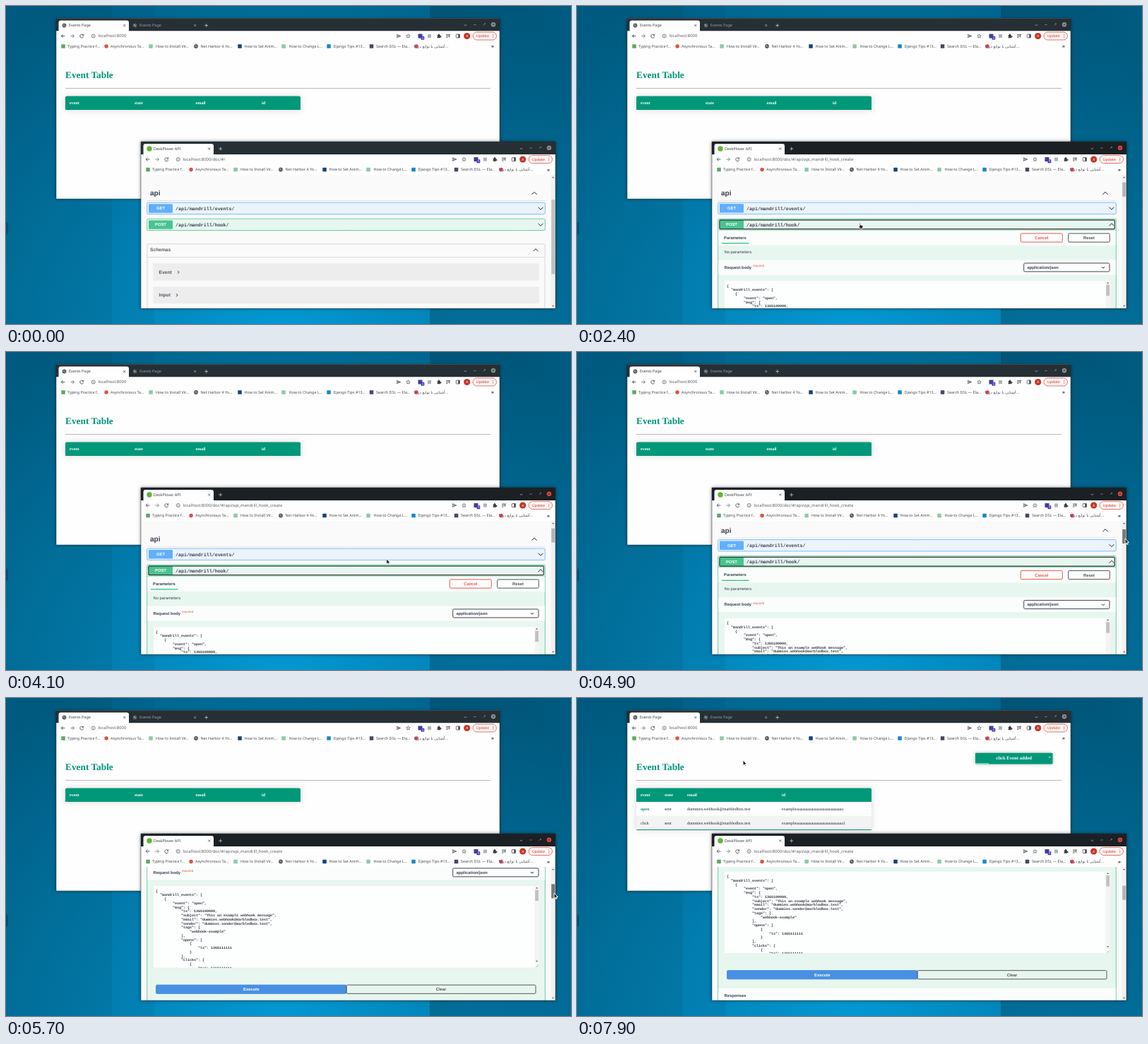
These frames come from a looping animation (800 px wide and 450 px high, 8 s). An HTML page with a canvas:

```html
<!DOCTYPE html>
<html lang="en">
<head>
<meta charset="utf-8">
<title>Event table demo</title>
<style>
html, body { margin: 0; width: 100%; height: 100%; overflow: hidden; background: #006a94; }
canvas { display: block; width: 800px; height: 450px; }
</style>
</head>
<body>
<canvas id="stage" width="800" height="450"></canvas>
<script>
const c = document.getElementById('stage').getContext('2d');
c.textRendering = 'geometricPrecision';

const UI = '"Noto Sans", sans-serif';
const SERIF = '"Liberation Serif", serif';
const SANS = '"Liberation Sans", sans-serif';
const MONO = '"Liberation Mono", monospace';
const GREEN = '#009879', INK = '#3b4151', ICON = '#4a4e52';
const EMAIL = 'dummies.webhook@marbledbox.test';
const EVENT_ID = 'example' + 'a'.repeat(25);

// y is the middle of the line
function text(s, x, y, size, color, font = UI, bold = false, align = 'left') {
  c.font = `${bold ? 'bold ' : ''}${size}px ${font}`;
  c.fillStyle = color;
  c.textAlign = align;
  c.fillText(s, x, y + size * 0.34);
}
function box(x, y, w, h, fill, stroke, r = 0, lw = 0.8) {
  c.beginPath();
  c.roundRect(x, y, w, h, r);
  if (fill) { c.fillStyle = fill; c.fill(); }
  if (stroke) { c.strokeStyle = stroke; c.lineWidth = lw; c.stroke(); }
}
function disc(x, y, r, fill, stroke) {
  box(x - r, y - r, 2 * r, 2 * r, fill, stroke, r, 0.7);
}
function path(d, x, y, stroke, lw = 0.9, fill) {
  const p = new Path2D(d);
  c.save();
  c.translate(x, y);
  if (fill) { c.fillStyle = fill; c.fill(p); }
  if (stroke) { c.strokeStyle = stroke; c.lineWidth = lw; c.stroke(p); }
  c.restore();
}
function shadow(color, blur, draw) {
  c.save();
  c.shadowColor = color;
  c.shadowBlur = blur;
  draw();
  c.restore();
}
function clipped(x, y, w, h, draw) {
  c.save();
  c.beginPath();
  c.rect(x, y, w, h);
  c.clip();
  draw();
  c.restore();
}
const cross = (x, y, color, r = 1.5) =>
  path(`M${-r} ${-r}L${r} ${r}M${r} ${-r}L${-r} ${r}`, x, y, color, 0.75);
const chevron = (x, y, up, size = 3.4, lw = 1) => {
  const h = size * (up ? 0.5 : -0.5);
  path(`M${-size} ${h}L0 ${-h}L${size} ${h}`, x, y, '#222', lw);
};

// Linear interpolation through [time, ...values] keys
function along(keys, t) {
  const last = keys.length - 1;
  if (t <= keys[0][0]) return keys[0].slice(1);
  if (t >= keys[last][0]) return keys[last].slice(1);
  const i = keys.findIndex(k => k[0] > t), a = keys[i - 1], b = keys[i];
  const f = (t - a[0]) / (b[0] - a[0]);
  return a.slice(1).map((v, j) => v + (b[j + 1] - v) * f);
}

function wallpaper() {
  let g = c.createRadialGradient(390, 460, 0, 390, 460, 560);
  g.addColorStop(0, '#0398d2');
  g.addColorStop(0.45, '#0283b6');
  g.addColorStop(1, '#005f86');
  box(0, 0, 800, 450, g);
  g = c.createLinearGradient(0, 0, 150, 0);
  g.addColorStop(0, 'rgba(0,50,70,.1)');
  g.addColorStop(1, 'rgba(0,50,70,.16)');
  box(0, 0, 150, 450, g);
  g = c.createLinearGradient(600, 0, 800, 0);
  g.addColorStop(0, 'rgba(0,45,65,.3)');
  g.addColorStop(1, 'rgba(0,45,65,.08)');
  box(600, 0, 200, 450, g);
  box(150, 0, 60, 450, 'rgba(0,60,90,.08)');
  box(-3, 306, 6, 18, 'rgba(0,40,60,.35)', null, 3);
}

function globe(x, y, r = 2.9) {
  disc(x, y, r, '#555a5f');
  path('M-1.8 -.8L-.2 -1.6L.4 -.3L-.8 .4ZM.2 .9L1.7 .1L1.2 1.6Z', x, y, null, 0, '#c3c7ca');
}

// [icon x, colour (none = globe), round, text x, label]
const BOOKMARKS = [
  [10, '#5aa95f', 0, 16, 'Typing Practice f...'],
  [71, '#dd5144', 1, 77, 'Asynchronous Ta...'],
  [134, '#8cc9a4', 0, 141, 'How to Install Vir...'],
  [198, '', 1, 204.5, 'Net Harbor 4 Yo...'],
  [260, '#14427a', 0, 266.5, 'How to Set Anim...'],
  [322, '#8cc9a4', 0, 329.5, 'How to Change L...'],
  [386, '#1787c9', 0, 392.5, 'Django Tips #13...'],
  [446.5, '#454b5e', 0, 453, 'Search DSL — Ela...'],
  [510, '#d0455a', 1, 521, 'آشنایی با توابع در پا...']
];

function browser(x, y, w, h, { tabs, active, url, focused }, page) {
  c.save();
  c.translate(x, y);
  shadow('rgba(0,0,0,.5)', 5, () => box(0, 0, w, h, '#fefefe'));
  box(0, 0, w, 18, focused ? '#1b2024' : '#263034');
  box(3.5 + active * 100, 3, 99.5, 17, '#fefefe', null, 3);
  tabs.forEach((tab, i) => {
    const left = i * 100, on = i === active;
    if (tab.dot) disc(12, 10, 3.7, tab.dot);
    else globe(left + 11.5, 10);
    text(tab.title, left + 18, 10, 5.42, on ? '#3c4043' : '#9aa0a6');
    cross(left + 96.7, 10, on ? '#444' : '#a5a9ad');
  });
  path('M-2.4 0H2.4M0 -2.4V2.4', tabs.length * 100 + 12.7, 10, '#c5c8ca', 0.8);

  // window controls
  path('M-1.7 -.7L0 1L1.7 -.7', w - 48.5, 9.5, '#b5babd', 0.8);
  path('M-1.5 0H1.5', w - 35, 9, '#8d9498', 0.8);
  path('M-1.3 1.3L1.3 -1.3M0 -1.4H1.4V0', w - 22, 8.7, '#8d9498', 0.7);
  disc(w - 9, 8.7, 3.2, focused ? '#e0483e' : '#8a9195');
  cross(w - 9, 8.7, '#263034', 1.2);

  // toolbar
  box(0, 18, w, 29, '#fefefe');
  path('M2.7 0H-2.4M0 -2.5L-2.5 0L0 2.5', 9.7, 25, ICON);
  path('M-2.7 0H2.4M0 -2.5L2.5 0L0 2.5', 23, 25, '#7b7f83');
  path('M2.1 -1.2A2.5 2.5 0 1 0 2.4 .8M2.4 -2.7V-.8H.4', 36.3, 25, ICON);
  disc(52.7, 25, 2.5, null, ICON);
  path('M0 -.2V1.4M0 -1.5V-.8', 52.7, 25, ICON, 0.7);
  text(url, 59.5, 25, 5.87, '#5b5f63');
  path('M-2.7 -2.3L2.8 0L-2.7 2.3L-2 0ZM-2 0H1', w - 143, 25, ICON, 0.8);
  path('M0 -2.7L.8 -.9L2.7 -.7L1.3 .6L1.7 2.5L0 1.5L-1.7 2.5L-1.3 .6L-2.7 -.7L-.8 -.9Z', w - 129.5, 25, ICON, 0.7);
  box(w - 115.5, 22, 6, 6, '#3f3d9c', null, 0.5);
  box(w - 111.5, 25.3, 4.8, 5, '#4b3ac0', null, 0.8);
  text('1', w - 109.1, 27.8, 4, '#fff', UI, true, 'center');
  box(w - 102, 22.5, 5, 5, '#a9b3bb', null, 0.5);
  path('M-2.4 -1.5H-.9A1 1 0 1 1 .9 -1.5H2V.1A1 1 0 1 1 2 1.6V2.7H-2.4V1.5A1 1 0 0 0 -2.4 -.3Z', w - 86, 25, null, 0, '#3d4145');
  path('M-2.9 -2H1.7M-2.9 0H1.7M-2.9 2H-.4M1.8 2V-2H3', w - 73, 25, ICON);
  box(w - 61.7, 22.5, 5.2, 5, null, ICON, 0.5);
  box(w - 58.8, 22.5, 2.3, 5, ICON);
  disc(w - 46.3, 25, 4.6, '#c63527');
  text('A', w - 46.3, 25, 4.8, '#fff', UI, false, 'center');
  box(w - 38, 19.5, 33.5, 11, '#fdf6f5', '#dc5448', 5.5, 0.8);
  text('Update', w - 33.3, 25, 5.3, '#d0372a');
  [-2, 0, 2].forEach(d => disc(w - 9.3, 25 + d, 0.6, '#d0372a'));

  // bookmarks
  BOOKMARKS.forEach(([ix, color, round, tx, label], i) => {
    if (color) box(ix - 2.7, 36.7, 5.5, 5.5, color, null, round ? 2.75 : 0.4);
    else globe(ix, 39.5);
    if (i < 8) text(label, tx, 39.5, 5.42, '#46494d');
    else text(label, 564, 39.5, 5.4, '#46494d', '"DejaVu Sans", sans-serif', false, 'right');
  });
  text('»', w - 10, 39.3, 6.5, '#333', UI, true, 'center');
  c.restore();
  clipped(x, y + 47, w, h - 47, page);
  box(x, y, w, h, null, 'rgba(30,40,45,.65)', 0, 0.7);
}

function eventPage(t) {
  const rows = t < 7300 ? 0 : t < 7400 ? 1 : 2;
  text('Event Table', 84, 97, 13.33, GREEN, SERIF, true);
  box(84, 116, 602, 0.8, '#a2a2a2');
  shadow('rgba(0,0,0,.15)', 8, () => box(84, 127.5, 333, 19.6 + rows * 20, '#fefefe', null, 2));
  box(84, 127.5, 333, 19.5, GREEN, null, [2, 2, 0, 0]);
  const cols = rows ? [90, 124, 156, 290] : [90, 182, 268.5, 362];
  ['event', 'state', 'email', 'id'].forEach((s, i) => text(s, cols[i], 137, 6, '#fff', SERIF, true));
  for (let r = 0; r < rows; r++) {
    const y = 147 + r * 19.7;
    box(84, y, 333, 19.7, r ? '#f3f3f3' : '#fefefe');
    [r ? 'click' : 'open', 'sent', EMAIL, EVENT_ID + (r ? '1' : '')].forEach((s, i) => {
      const lead = !r && !i;
      text(s, cols[i], y + 9.8, 6, lead ? GREEN : '#222', SERIF, lead);
    });
  }
  if (!rows) return;
  box(84, 146.5 + rows * 19.7, 333, 1, GREEN);
  shadow('rgba(0,0,0,.3)', 4, () => box(564, 77.8, 109.5, 15.8, GREEN, null, 1));
  text(`${rows > 1 ? 'click' : 'open'} Event added`, 618.7, 85, 6.67, '#fff', SERIF, true, 'center');
  cross(669.3, 83.7, '#dff5ef', 1.1);
  box(564, 92.4, Math.max(0, t - 7400) * 0.038, 1, '#e3f4ef');
}

// "indent|line"
const JSON_LINES = ['0|{', '2|"mandrill_events": [', '4|{', '8|"event": "open",', '8|"msg": {',
  '12|"ts": 1365109999,', '12|"subject": "This an example webhook message",',
  `12|"email": "${EMAIL}",`, '12|"sender": "dummies.sender@marbledbox.test",',
  '12|"tags": [', '16|"webhook-example"', '12|],', '12|"opens": [', '16|{',
  '20|"ts": 1365111111', '16|}', '12|],', '12|"clicks": [', '16|{', '20|"ts": 1365111111'];

function route(y, method, name, color, tint, open) {
  box(199.7, y, 563.6, open ? 800 : 16.3, tint, color, 1.7, 0.8);
  box(202, y + 2, 34, 12.5, color, null, 1.2);
  text(method, 219, y + 8.2, 5.83, '#fff', SANS, true, 'center');
  text(name, 240, y + 8.2, 6.63, INK, MONO, true);
  chevron(757, y + 8.3, open);
}
function button(x, y, w, label, color, fill) {
  box(x, y, w, 12.2, fill, color, 1.5, 1);
  text(label, x + w / 2, y + 6.2, 5.83, fill ? '#fff' : color, SANS, true, 'center');
}
const arrowHead = (x, y, up) => path(up ? 'M-1.6 .8L0 -.9L1.6 .8Z' : 'M-1.6 -.8L0 .9L1.6 -.8Z', x, y, null, 0, '#555');

function requestForm(a, hover) {
  const strip = 'rgba(255,255,255,.8)';
  box(200, a + 52, 563, 0.7, '#49cc90');
  box(200, a + 52.8, 563, 21, strip);
  text('Parameters', 208, a + 63, 5.83, INK, SANS, true);
  box(205, a + 70, 38.5, 1.6, '#49cc90');
  button(628.3, a + 57, 59, 'Cancel', '#f2554d');
  button(695.7, a + 57, 58.6, 'Reset', '#555');
  text('No parameters', 208.5, a + 83, 5.83, INK, SANS);
  box(200, a + 94.5, 563, 21, strip);
  text('Request body', 208.5, a + 105, 5.83, INK, SANS, true);
  text('required', 249, a + 103, 4.4, '#f2554d', SANS);
  box(632.7, a + 99, 121.3, 12, '#fbfcfc', '#41444e', 1.7, 1);
  text('application/json', 637.5, a + 105, 5.83, INK, SANS, true);
  chevron(745, a + 105.2, false, 2, 1);

  const top = a + 123.7;
  box(208.5, top, 546.5, 116.5, '#fdfefe', '#e2e8e5', 1, 0.4);
  clipped(208.5, top, 540, 116.5, () => JSON_LINES.forEach((s, i) => {
    const [indent, line] = s.split('|');
    text(line, 212 + indent * 3, top + 7.2 + i * 5.76, 5, '#30353c', MONO, true);
  }));
  box(748.5, top + 0.5, 6.3, 110, '#f3f4f4');
  box(749.2, top + 6, 4.8, 15.5, '#c1c1c1');
  arrowHead(751.6, top + 3, true);
  arrowHead(751.6, top + 107, false);
  path('M-2 2L2 -2M0 2L2 0', 752, top + 113.5, '#888', 0.6);

  const run = () => button(212.5, a + 264.2, 269.5, 'Execute', '#4990e2', '#4990e2');
  if (hover) shadow('rgba(0,0,0,.35)', 3, run);
  else run();
  button(482, a + 264.2, 268, 'Clear', '#555');
  box(200, a + 289.3, 563, 60, strip);
  text('Responses', 208.5, a + 299.5, 5.83, INK, SANS, true);
}

function docPage(s) {
  const a = s.open ? 252.4 - s.scroll : 265;
  box(191, 239, 587, 189, '#fafafa');
  text('api', 204, a, 10, INK, SANS, true);
  chevron(748, a, true, 3.6);
  box(199.5, a + 10.3, 564, 0.6, '#d5d7da');
  route(a + 13.2, 'GET', '/api/mandrill/events/', '#61affe', '#ebf3fb');
  route(a + 36.2, 'POST', '/api/mandrill/hook/', '#49c490', '#e8f6f0', s.open);
  if (s.postFocus) box(201.8, a + 38, 559.5, 12.7, null, '#25352f', 1, 1.1);
  if (s.open) requestForm(a, s.hover);
  else {
    box(200, 336.7, 563, 110, '#fafafa', '#c6c8cb', 1.5, 0.7);
    text('Schemas', 204, 345, 6.67, '#555a66', SANS, true);
    chevron(750, 345.3, true);
    box(200, 355.2, 563, 0.7, '#d0d2d5');
    [['Event', 364.2, 244], ['Input', 396.7, 242]].forEach(([name, y, mark]) => {
      box(208.3, y, 546.5, 24.2, '#ededee', null, 1.5);
      text(name, 216.6, y + 12.2, 6.67, '#505560', SANS, true);
      path('M-1 -2L1 0L-1 2', mark, y + 12.5, '#333', 1);
    });
  }
  box(771.5, 239, 6.5, 189, '#f1f1f1');
  arrowHead(774.7, 242.5, true);
  arrowHead(774.7, 424.5, false);
  if (s.open) box(772.2, 251 + s.scroll * 0.112, 5, 20, s.drag ? '#787878' : '#b5b5b5');
  else box(772.2, 274, 5, 105.5, '#c1c1c1');
}

const ARROW = 'M0 0V7.6L1.8 6L3 8.6L4.3 8L3.2 5.5H5.5Z';
const HAND = 'M0 0Q1.2 -.5 1.4 .8L1.7 2.9L4.3 3.4Q5.3 3.8 5 5L4.3 8H.8L-1.4 5Q-1.3 4 .1 4.8Z';
const POINTER = [
  [300, 470, 420], [900, 222, 26], [1000, 222, 26], [1300, 136, 31], [1400, 136, 31],
  [1900, 430, 284], [2200, 400, 307], [2800, 400, 307], [3200, 489, 271], [3600, 420, 307],
  [3800, 420, 307], [4700, 776, 264], [4900, 776, 264], [5400, 776, 273], [5800, 776, 277],
  [6100, 776, 279], [6300, 776, 279], [6400, 757, 279], [6900, 345, 390], [7200, 345, 390], [7800, 235, 88]
];
const SCROLL = [[4600, -12.5], [4700, 0], [4900, 0], [5400, 82], [5800, 120], [6100, 131]];
const within = (t, from, to) => t >= from && t < to;

function draw(now) {
  const t = Math.floor(now % 8000 / 100) * 100;
  const tableFront = within(t, 900, 1900);
  const open = within(t, 2400, 2900) || t >= 3700;
  const doc = {
    open, scroll: along(SCROLL, t)[0], postFocus: t >= 2300,
    drag: within(t, 4700, 6300), hover: within(t, 6900, 7300)
  };
  const events = { title: 'Events Page' };
  const tableWindow = () => browser(71, 17.5, 628, 255.5, {
    tabs: [events, events], active: within(t, 900, 1400) ? 1 : 0,
    url: 'localhost:8000', focused: tableFront
  }, () => eventPage(t));
  const docWindow = () => browser(191, 192, 587, 236, {
    tabs: [{ title: 'DeskPlover API', dot: '#5cb832' }], active: 0,
    url: 'localhost:8000/doc/#/' + (open ? 'api/api_mandrill_hook_create' : ''),
    focused: t >= 1900
  }, () => docPage(doc));

  wallpaper();
  (tableFront ? [docWindow, tableWindow] : [tableWindow, docWindow]).forEach(f => f());
  if (t >= 300) {
    const [x, y] = along(POINTER, t);
    const hand = within(t, 1900, 4100) || doc.hover;
    path(hand ? HAND : ARROW, x, y, '#f4f4f4', 1, '#222');
  }
  requestAnimationFrame(draw);
}
requestAnimationFrame(draw);
</script>
</body>
</html>
```
